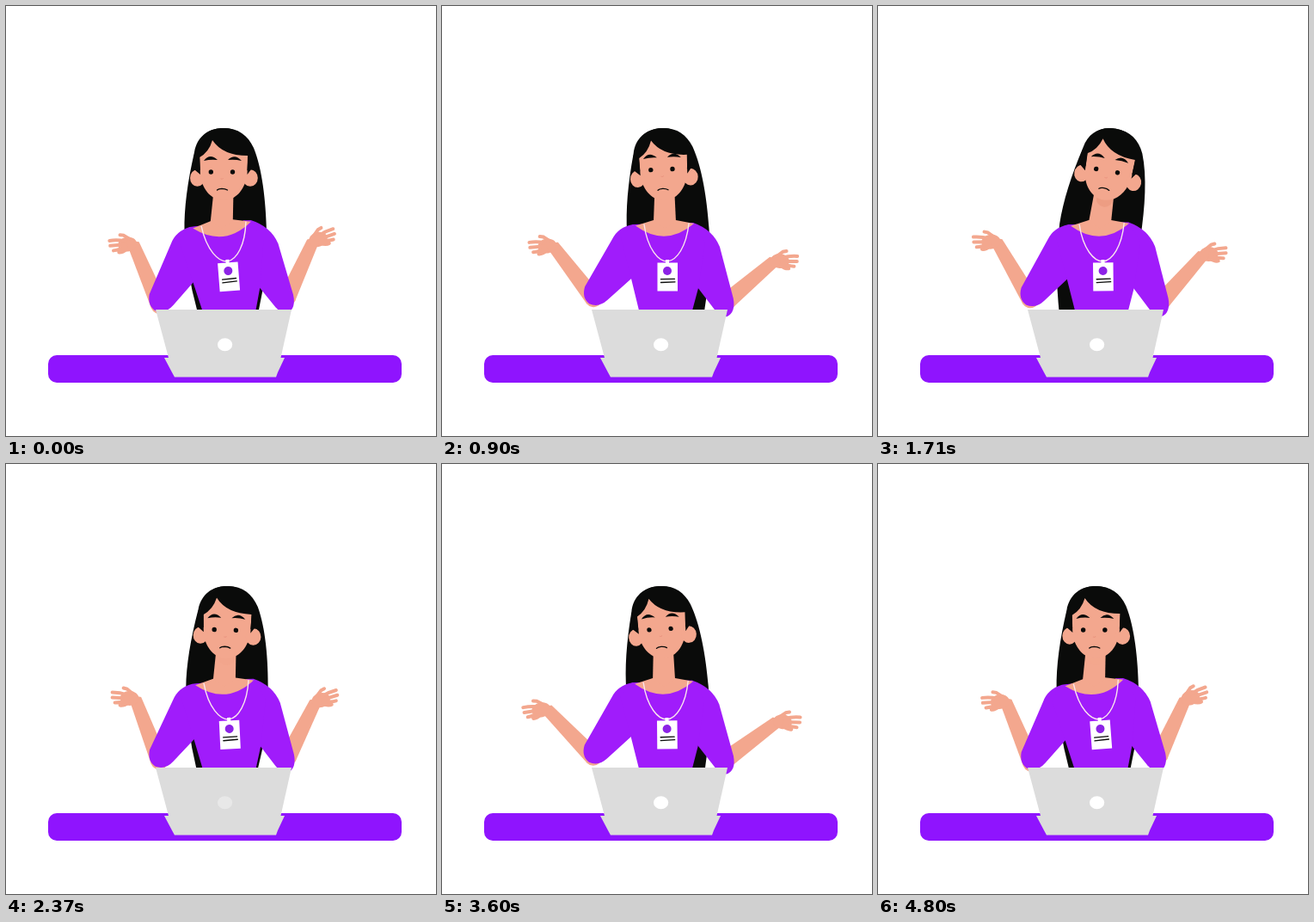
Animation of 500x500 px, one loop 4.83 s. Source, as an HTML page with a canvas:

```html
<!DOCTYPE html>
<html lang="en">
<head>
<meta charset="utf-8">
<title>Shrug</title>
<style>
html, body { margin: 0; height: 100%; overflow: hidden; background: #fff; }
canvas { display: block; }
</style>
</head>
<body>
<canvas id="stage" width="500" height="500"></canvas>
<script>
const ctx = document.getElementById('stage').getContext('2d');
const LOOP = 4830, FIRST_SHRUG = 2520, STEP = 30;
const SKIN = '#f3a78e', HAIR = '#0a0b0a', SHIRT = '#a01cfb', DESK = '#8f14fe', LAPTOP = '#dcdcdc';

// phase, torso tilt, head shift, head tilt, face lift, arm raise,
// left and right forearm angle, left and right hand lift
const POSES = [
  [0, -4.5, 0, 0, 0, 1, -23, 24.5, -8, 16],
  [.357, 0, 4.5, -2.5, -3, .07, -37.5, 49.5, -8, -4],
  [.468, -.5, 2.5, -3.5, -1, 0, -44, 53.5, -12, -5],
  [.679, -.5, 15.5, 10, -1, .35, -30, 41.5, -4, 1],
  [.766, -1.5, 12.5, 8.5, -2, .6, -27, 32.5, -2, 9],
  [.94, -2.8, 4, 1.8, 0, .9, -21, 26.5, 0, 14]
];

// Smooth periodic interpolation, flat at the extremes
function poseAt(phase) {
  const n = POSES.length;
  const key = (i, c) => POSES[(i + n) % n][c] + (c ? 0 : Math.floor(i / n));
  let i = n - 1;
  while (POSES[i][0] > phase) i--;
  const span = key(i + 1, 0) - key(i, 0), u = (phase - key(i, 0)) / span;
  const slope = (j, c) => {
    const before = key(j, c) - key(j - 1, c), after = key(j + 1, c) - key(j, c);
    return before * after <= 0 ? 0 : (before + after) / (key(j + 1, 0) - key(j - 1, 0));
  };
  return POSES[0].slice(1).map((_, k) => {
    const c = k + 1, a = key(i, c), b = key(i + 1, c);
    return a + (b - a) * u * u * (3 - 2 * u)
      + span * u * (1 - u) * (slope(i, c) * (1 - u) - slope(i + 1, c) * u);
  });
}

function fill(path, color) {
  ctx.fillStyle = color;
  ctx.fill(new Path2D(path));
}

function line(path, color, width) {
  ctx.strokeStyle = color;
  ctx.lineWidth = width;
  ctx.lineCap = 'round';
  ctx.stroke(new Path2D(path));
}

function oval(x, y, rx, ry, color) {
  ctx.fillStyle = color;
  ctx.beginPath();
  ctx.ellipse(x, y, rx, ry, 0, 0, 7);
  ctx.fill();
}

function group(draw) {
  ctx.save();
  draw();
  ctx.restore();
}

function turn(x, y, degrees) {
  ctx.translate(x, y);
  ctx.rotate(degrees * Math.PI / 180);
  ctx.translate(-x, -y);
}

function hand() {
  oval(-7, -1, 11, 8.5, SKIN);
  line('M-4 -7 L-10 -12 L-14 -13', SKIN, 4);
  line('M-9 -5 Q-18 -8 -27 -8 M-9 -1 L-27 -2 M-9 2 Q-18 4 -24 4 M-8 4 Q-14 8 -18 7', SKIN, 4);
}

function forearm(x, y, length, angle, lift, flip) {
  ctx.translate(x, y);
  group(() => {
    turn(0, 0, angle);
    oval(0, 0, 10, 10, SKIN);
    fill(`M-10 0 L-7 ${-length} Q0 ${-length - 6} 7 ${-length} L10 0Z`, SKIN);
  });
  const a = angle * Math.PI / 180;
  ctx.translate(length * Math.sin(a), -length * Math.cos(a));
  ctx.scale(flip, 1);
  turn(0, 0, lift);
  hand();
}

function arm(torso, shoulderX, bend, elbow, length, angle, lift, flip, sleeve) {
  group(() => {
    turn(shoulderX, 270, bend);
    group(() => {
      turn(...elbow, -torso - bend);
      forearm(...elbow, length, angle, lift, flip);
    });
    fill(sleeve, SHIRT);
  });
}

function badge() {
  line('M235 254 C239 283 252 297 262 297 C273 296 284 280 287 253', '#fbe6ee', 1.4);
  fill('M260 295 h4 v4 h-4Z M250.5 298.5 h23.5 v33 h-23.5Z', '#fff');
  oval(262, 308, 5, 5, '#8c22e6');
  line('M254.5 317.7 L270.5 317.3 M254.5 321.5 L271 320.8', HAIR, 1.3);
}

function face(lift, eye) {
  fill('M225 165 L226 198 C229 215 240 226 253 226 C266 226 277 215 280 198 L282 165 L240 150Z', SKIN);
  oval(222.5, 200, 8.5, 9.8, SKIN);
  oval(284, 200, 8.8, 9.8, SKIN);
  fill(`M253 142 C232 142 219 155 217 188 L220 191 L226 196 L225 176 Q236 170 240 156
    Q252 174 281 174 L280.5 196 L285 190 L290 186 C290 165 277 142 253 142Z`, HAIR);
  line('M245.5 214 Q247 212.5 251 212.3 Q255 212.3 257.5 214', HAIR, 1.3);
  ctx.translate(0, lift);
  fill('M230 180 Q237 170.5 246 179 Q238 178 230 180Z M258 179 Q266 171 274 180 Q266 178 258 179Z', HAIR);
  line('M250 201 Q252 202 252.5 200.5', '#ea9580', 1);
  oval(238.3, 193, 2.7, 2.7 * eye, HAIR);
  oval(263.5, 193, 2.7, 2.7 * eye, HAIR);
}

function desk(t) {
  ctx.fillStyle = DESK;
  ctx.beginPath();
  ctx.roundRect(49, 406, 411, 32, 10);
  ctx.fill();
  fill('M174 353 H332 L319.5 409 H324 L316 426 L314 431.5 H196 L193 426 L184 409 H189Z', LAPTOP);
  ctx.globalAlpha = Math.min(1, Math.max(.35, Math.abs(t - 2415) / 300));
  oval(254.6, 393.8, 8.6, 7.5, '#fff');
  ctx.globalAlpha = 1;
}

function draw(t) {
  const phase = t < FIRST_SHRUG ? t / FIRST_SHRUG : (t - FIRST_SHRUG) / (LOOP - FIRST_SHRUG);
  const [torso, headX, tilt, lift, raise, foreL, foreR, handL, handR] = poseAt(phase);
  const eye = Math.min(1, .4 + Math.abs(phase - .766) / .05);
  const placeHead = () => {
    ctx.translate(headX, 0);
    turn(253, 190, tilt);
  };

  ctx.clearRect(0, 0, 500, 500);
  group(() => {
    placeHead();
    fill(`M253 142 C235 142 222 152 219 170 C211 205 207 235 207.5 262 Q210 310 222 353 L228 375
      H290 L294 353 Q304 310 303 262 C302 225 298 190 288 165 C281 150 270 142 253 142Z`, HAIR);
  });

  group(() => {
    turn(259, 355, torso);
    arm(torso, 215, -2.5 * raise, [176, 340], 77, foreL, handL, 1,
      `M235 254 L222 254 Q205 257 198 271 L166 326 Q162 339 171 346 Q182 351 192 342
       L220 317 L236 290Z`);
    arm(torso, 305, 3 * raise, [332, 343], 71, foreR, handR, -1,
      `M283 252 L292 252 Q315 260 323 280 L339 340 Q342 356 332 361 Q325 362 318 354
       L298 328 L280 290Z`);
    fill('M222 254 L292 252 L306 275 L298 328 L290 358 V372 H230 V358 L220 317 L208 270Z', SHIRT);
    fill('M225 255.5 L246 249 H272 L293 253 Q260 281 225 255.5Z', SKIN);
  });

  const bend = torso * Math.PI / 180, nod = tilt * Math.PI / 180;
  const baseX = 259 + 105 * Math.sin(bend), topX = 253 + headX - 30 * Math.sin(nod);
  fill(`M${topX - 11.5} 215 H${topX + 11.5} L${baseX + 13} 251 L${baseX} 259 L${baseX - 13} 251Z`, SKIN);

  group(() => {
    turn(259, 355, torso);
    badge();
  });
  group(() => {
    placeHead();
    ctx.globalAlpha = Math.max(0, Math.min(1, tilt / 10));
    oval(254, 225, 9.5, 9, '#ed9d83');
    ctx.globalAlpha = 1;
    face(lift, eye);
  });
  desk(t);
}

function tick(now) {
  draw(Math.floor((now % LOOP) / STEP) * STEP);
  requestAnimationFrame(tick);
}
tick(0);
</script>
</body>
</html>
```
